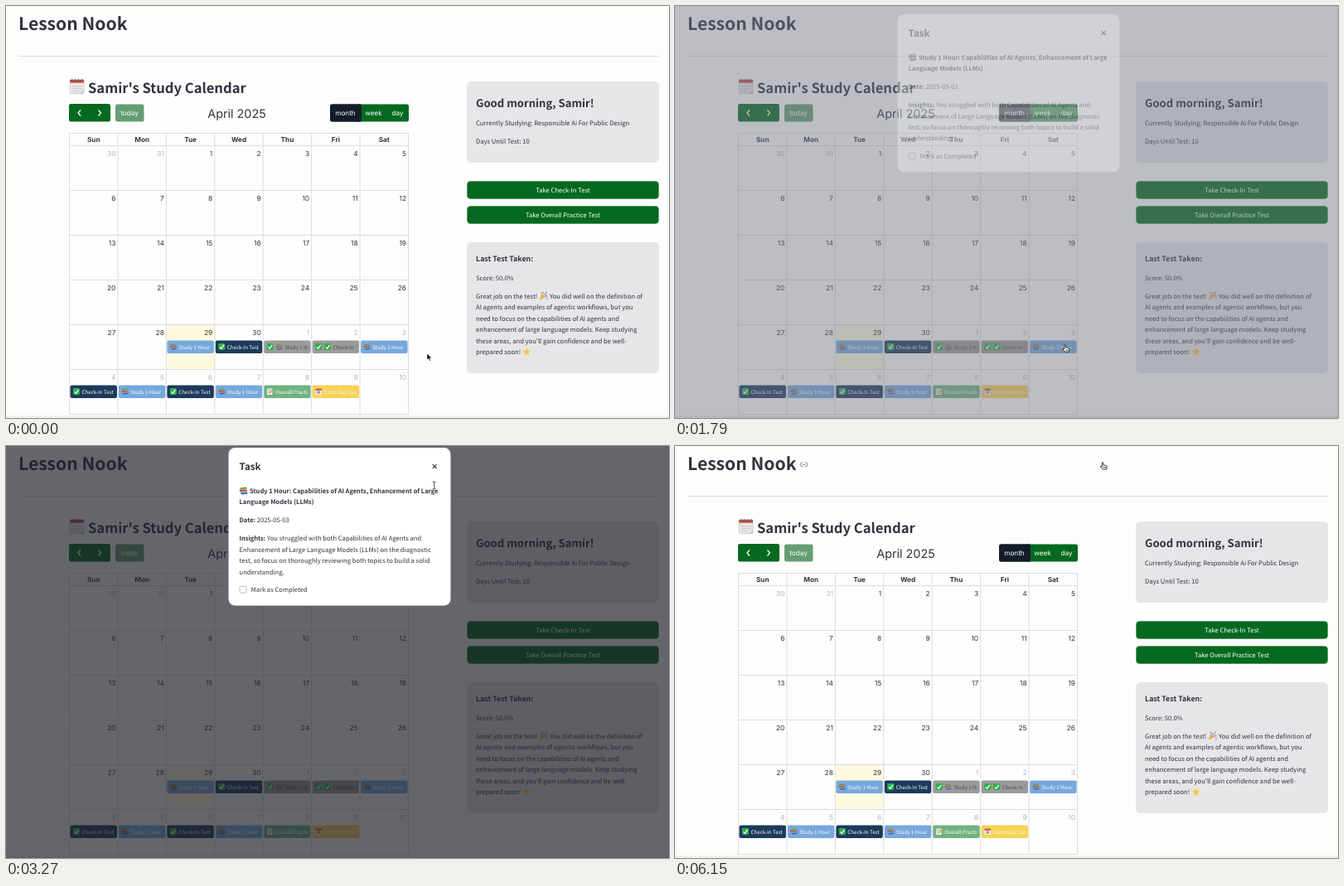
Recreate the animation shown at these times as an HTML page. Size 800 by 497 pixels, loop 6.18 s.

```html
<!DOCTYPE html>
<html lang="en">
<head>
<meta charset="utf-8">
<title>Study planner</title>
<style>
html, body { margin: 0; width: 100%; height: 100%; overflow: hidden; background: #fdfdfd; }
svg { display: block; font-family: "Noto Sans CJK JP", "Noto Sans CJK SC", "Noto Sans CJK", "Noto Sans", sans-serif; }
text { white-space: pre; text-rendering: geometricPrecision; }
.cal { font-family: Inter, "Liberation Sans", sans-serif; }
</style>
</head>
<body>
<svg id="stage" width="800" height="497" viewBox="0 0 800 497">
  <defs>
    <!-- 10 x 10 icons -->
    <g id="books">
      <path d="M1 2l7-1 1 2-7 1.4z" fill="#3f9b4f"/>
      <path d="M.5 4l8-.6.8 2.4-8 .6z" fill="#c9463d"/>
      <path d="M1.5 6.8l7.5-.6.6 2.2-6.6 1z" fill="#3f78b5"/>
      <path d="M2 3.6l6.6-.9M2 6.2l7-.6" stroke="#f2e6cf" stroke-width=".5"/>
    </g>
    <g id="check">
      <rect x=".5" y=".5" width="9" height="9" rx="1.6" fill="#2fae4b"/>
      <path d="M2.4 5.4l2 2.2 3.4-5" fill="none" stroke="#fff" stroke-width="1.4"/>
    </g>
    <g id="memo">
      <path d="M1 1h7v8.5H1z" fill="#f3f3ee"/>
      <path d="M2 3h5M2 5h4M2 7h3" stroke="#8c9299" stroke-width=".7"/>
      <path d="M4.2 7.8L9 2.4" stroke="#e9a23b" stroke-width="1.4"/>
    </g>
    <g id="date">
      <rect x="1" y="1" width="8" height="8.5" rx=".8" fill="#f2efec"/>
      <path d="M1 1h8v2.6H1z" fill="#d64b42"/>
      <path d="M3 5.3h4M3 7.2h4" stroke="#595d66" stroke-width="1"/>
    </g>
    <g id="party">
      <path d="M.5 9.5L3 3.5l3.6 3.6z" fill="#e8b23d"/>
      <path d="M4 4q0-2 1.4-3M6 6q2-1.4 3.6-.6M5 5l3-3" fill="none" stroke="#b0524f" stroke-width=".9"/>
      <path d="M1.8 1.6h1.2M7.8 1h1.2M8.3 8h1.2M6.5 3.4h1" stroke="#4a87c4" stroke-width="1.1"/>
    </g>
    <path id="star" d="M5 .3l1.4 3 3.3.4-2.4 2.3.6 3.4L5 7.8 2.1 9.4l.6-3.4L.3 3.7l3.3-.4z" fill="#f0c64e" stroke="#f7e3a0" stroke-width=".6"/>
    <g id="pad">
      <rect x=".6" y="1" width="8.6" height="8.6" rx=".6" fill="#e9e7e6" stroke="#b9b6b6" stroke-width=".3"/>
      <path d="M.6 1h8.6v1.9H.6z" fill="#b84a43"/>
      <path d="M2 .4v1.5M4 .4v1.5M6 .4v1.5M8 .4v1.5" stroke="#77777d" stroke-width=".5"/>
      <path d="M2 5h6M2 6.5h6M2 8h4" stroke="#c4c4c9" stroke-width=".4"/>
      <path d="M9.2 7.2v2.4H6.8z" fill="#c9c6c6"/>
    </g>
  </defs>
  <g id="page"></g>
  <rect id="dim" width="800" height="497"/>
  <g id="dialog"></g>
  <path id="link" d="M154.500 20.200h-1a2.300 2.300 0 0 0 0 4.600h1M156.500 20.200h1a2.300 2.300 0 0 1 0 4.600h-1M153.500 22.500h4" fill="none" stroke="#85868d"/>
  <g id="cursor">
    <path id="arrow" d="M0 0v8l1.800-1.600 1.300 2.800 1.400-.6-1.300-2.700h2.500z" fill="#000" stroke="#fff" stroke-width=".7"/>
    <path id="beam" d="M-1.800-4q1.800 0 1.800 1 0-1 1.800-1M0-3v6.500M-1.800 4.500q1.800 0 1.800-1 0 1 1.800 1" fill="none" stroke="#222" stroke-width=".8"/>
    <path id="hand" d="M-1.600-3.500q.8-.8 1.500.2V-.6l3 .6q1.500.4 1.300 1.700L3.600 4.600H-.8L-3.600 1.500q-.2-1.100 1-.8l1 .6zM.6 1.500v1.700M2.200 1.500v1.700" fill="#fff" stroke="#111" stroke-width=".8"/>
  </g>
</svg>
<script>
const $ = id => document.getElementById(id);
const INK = '#31333f', GREEN = '#05691f', LOOP = 6180, BODY = 7.64;

const text = (x, y, size, str, attrs = '') =>
  `<text x="${x}" y="${y}" font-size="${size}" fill="${INK}" ${attrs}>${str}</text>`;
const box = (x, y, w, h, fill, r = 0, attrs = '') =>
  `<rect x="${x}" y="${y}" width="${w}" height="${h}" rx="${r}" fill="${fill}" ${attrs}/>`;
const icon = (name, x, y, size) =>
  `<use href="#${name}" transform="translate(${x} ${y}) scale(${size / 10})"/>`;
const BOLD = 'font-weight="700"', MID = 'text-anchor="middle"', END = 'text-anchor="end"';
const WHITE = 'style="fill:#fff"';

function calendar() {
  const left = 76.5, col = 58.43, top = 168.5, row = 54;
  const colX = c => left + c * col, rowY = r => top + r * row;
  let s = icon('pad', 76, 87, 19.5) + text(99, 104.5, 16.6, "Samir's Study Calendar", BOLD);

  s += '<g class="cal">';
  s += box(76, 118, 50, 21.5, GREEN, 2.5) + box(132, 118.5, 34.5, 21, '#659d72', 2.5);
  s += '<path d="M90 125.500l-3 3.500 3 3.500M111.500 125.500l3 3.500-3 3.500" fill="none" stroke="#fff" stroke-width="1.200"/>';
  s += box(391, 118.5, 95, 21, GREEN, 2.5) + box(391, 118.5, 37.5, 21, '#141b29', 2.5) + box(424, 118.5, 4.5, 21, '#141b29');
  for (const [x, label] of [[149, 'today'], [409.5, 'month'], [443.5, 'week'], [472.5, 'day']])
    s += text(x, 132, 8.2, label, MID + ' ' + WHITE);
  s += text(278.5, 134.5, 14.4, 'April 2025', MID);

  s += box(colX(2), rowY(4), col, row, '#fffadf');
  for (let r = 0; r < 7; r++) s += box(left - .5, rowY(r) - .5, 410, 1, '#ddd');
  s += box(left - .5, 153, 410, 1, '#ddd');
  for (let c = 0; c < 8; c++) s += box(colX(c) - .5, 153, 1, 340, '#ddd');
  'Sun Mon Tue Wed Thu Fri Sat'.split(' ').forEach((d, c) =>
    s += text(colX(c) + col / 2, 164, 8.2, d, MID + ' ' + BOLD));

  for (let i = 0; i < 42; i++) {
    const day = new Date(2025, 2, 30 + i), other = day.getMonth() !== 3;
    s += text(colX(i % 7 + 1) - 2.5, rowY(i / 7 | 0) + 12.4, 8.4, day.getDate(), END + (other ? ' opacity=".35"' : ''));
  }

  const study = ['#77a8dc', 'Study 1 Hour', ['books']];
  const quiz = ['#1c3a5c', 'Check-In Test', ['check']];
  const events = [
    [30, ...study], [31, ...quiz],
    [32, '#9b9b9b', 'Study 1 Hour', ['check', 'books'], '#4b4b4b'],
    [33, '#9b9b9b', 'Check-In Test', ['check', 'check'], '#4b4b4b'],
    [34, ...study], [35, ...quiz], [36, ...study], [37, ...quiz], [38, ...study],
    [39, '#6fb281', 'Overall Practice', ['memo']],
    [40, '#f6d257', 'Exam Day: Good', ['date'], '#fff7dc']
  ];
  for (const [cell, fill, label, icons, ink = '#fff'] of events) {
    const x = colX(cell % 7) + 1, y = rowY(cell / 7 | 0) + 19;
    s += box(x, y, col - 2, 15.5, fill, 2);
    s += `<svg x="${x}" y="${y}" width="${col - 5}" height="15.500">`;
    icons.forEach((name, i) => s += icon(name, 3 + i * 11, 3, 9));
    s += text(3 + icons.length * 11, 10, 6.2, label, `style="fill:${ink}"`) + '</svg>';
  }
  return s + '</g>';
}

function sidebar() {
  const card = '#e6e6e8';
  let s = box(556, 91, 232, 98, card, 5) + box(556, 285, 232, 158, card, 5);
  s += text(567, 122.3, 13.1, 'Good morning, Samir!', BOLD);
  s += text(567, 144.2, BODY, 'Currently Studying: Responsible Ai For Public Design');
  s += text(567, 166.2, BODY, 'Days Until Test: 10');
  [[211, 'Take Check-In Test'], [241, 'Take Overall Practice Test']].forEach(([y, label]) =>
    s += box(556.5, y + .5, 231, 21, GREEN, 4, 'stroke="#3f8c52" stroke-width=".6"') +
      text(672, y + 13.8, BODY, label, MID + ' ' + WHITE));
  s += text(567, 307.6, 8.9, 'Last Test Taken:', BOLD) + text(567, 330.6, BODY, 'Score: 50.0%');
  ['Great job on the test!', 'AI agents and examples of agentic workflows, but you',
   'need to focus on the capabilities of AI agents and', 'enhancement of large language models. Keep studying',
   "these areas, and you'll gain confidence and be well-", 'prepared soon!'].forEach((line, i) =>
    s += text(567, 352.6 + i * 13.5, BODY, line));
  s += icon('party', 643, 344, 11) + text(656, 352.6, BODY, 'You did well on the definition of');
  return s + icon('star', 623, 411.5, 11);
}

function dialog() {
  const bold = str => `<tspan font-weight="700" font-size="7.5">${str}</tspan>`;
  let s = box(268.5, 2, 268, 190.5, '#fff', 8) + text(281.5, 29, 11.6, 'Task', BOLD);
  s += '<path d="M514.700 22.200l5 5m0-5l-5 5" stroke="#31333f" stroke-width="1.100"/>';
  s += icon('books', 281, 48.5, 11);
  const lines = [
    [294, 56.8, bold('Study 1 Hour: Capabilities of AI Agents, Enhancement of Large')],
    [281.5, 70.2, bold('Language Models (LLMs)')],
    [281.5, 92.2, bold('Date:') + ' 2025-05-03'],
    [281.5, 114.3, bold('Insights:') + ' You struggled with both Capabilities of AI Agents and'],
    [281.5, 127.8, 'Enhancement of Large Language Models (LLMs) on the diagnostic'],
    [281.5, 141.2, 'test, so focus on thoroughly reviewing both topics to build a solid'],
    [281.5, 154.6, 'understanding.'],
    [295.5, 176.2, 'Mark as Completed']
  ];
  for (const [x, y, str] of lines) s += text(x, y, BODY, str);
  return s + box(282, 169.3, 8, 8, '#fff', 1.5, 'stroke="#a9aab2" stroke-width=".8"');
}

$('page').innerHTML = text(15, 28.6, 21.1, 'Lesson Nook', BOLD) +
  box(15, 60, 773, 1, '#dcdce0') + box(0, 494, 800, 3, '#f0f0f0') + calendar() + sidebar();
$('dialog').innerHTML = dialog();

const span = (t, start, length) => Math.min(1, Math.max(0, (t - start) / length));
const easeOut = x => 1 - (1 - x) ** 4;
const smooth = x => x * x * (3 - 2 * x);
const mix = (a, b, k) => a + (b - a) * k;
const CLOSE = 4800;

function draw() {
  const t = performance.now() % LOOP;
  const gone = easeOut(span(t, CLOSE, 270));

  // The veil starts as a pale blue haze and darkens as it thickens.
  const veil = easeOut(span(t, 1743, 330)) - gone;
  $('dim').setAttribute('opacity', .68 * Math.sqrt(Math.max(0, veil)));
  $('dim').setAttribute('fill', `rgb(${mix(186, 30, veil)} ${mix(192, 32, veil)} ${mix(208, 40, veil)})`);

  const shown = easeOut(span(t, 1762, 330)) - gone;
  $('dialog').setAttribute('opacity', shown);
  $('dialog').setAttribute('transform', `translate(0 ${11.25 * (1 - shown)})`);
  $('link').setAttribute('visibility', t > CLOSE + 100 ? 'visible' : 'hidden');

  // Pointer goes to the event, then up to the close button.
  const toEvent = smooth(span(t, 650, 620)), toClose = smooth(span(t, 2200, 1260));
  const x = mix(mix(508, 471.5, toEvent), 517, Math.min(1, toClose * 1.06));
  const y = mix(mix(419, 412.5, toEvent), 23.5, toClose);
  const onEvent = x < 485 && y > 403 && y < 420;
  const shape = onEvent || y < 34 ? 'hand' : y < 192 ? 'beam' : 'arrow';
  for (const id of ['arrow', 'beam', 'hand']) $(id).setAttribute('visibility', id === shape ? 'visible' : 'hidden');
  $('cursor').setAttribute('transform', `translate(${x} ${y})`);
  requestAnimationFrame(draw);
}
draw();
</script>
</body>
</html>
```
